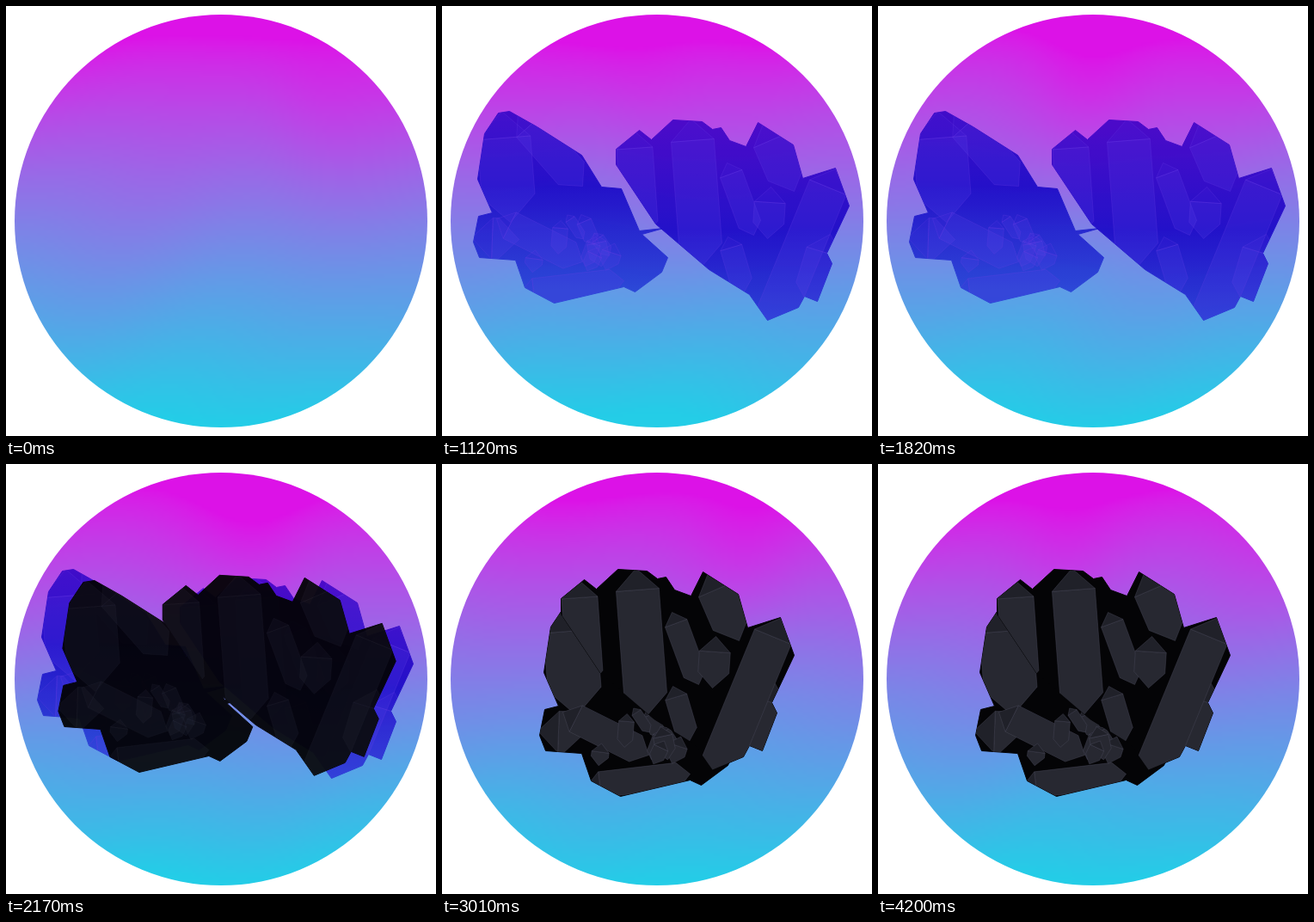
Animation of 500 by 500 pixels, one loop 4270 ms. Source, as an HTML page with a canvas:

```html
<!DOCTYPE html>
<html>
<head>
<meta charset="utf-8">
<style>
html, body { margin: 0; width: 100%; height: 100%; overflow: hidden; background: #fff; }
canvas { display: block; width: 500px; height: 500px; }
</style>
</head>
<body>
<canvas id="stage" width="500" height="500"></canvas>
<script>
const LOOP = 4270, STEP = 70, GRID = 125, CELL = 500 / GRID;
const ctx = document.getElementById('stage').getContext('2d');

function layer(size) {
  const c = document.createElement('canvas');
  c.width = c.height = size;
  return c.getContext('2d');
}
const sky = layer(GRID), ghost = layer(500), solid = layer(500);
const pixels = sky.createImageData(GRID, GRID);

const clamp = v => Math.max(0, Math.min(1, v));
const ramp = (t, a, b) => clamp((t - a) / (b - a));
const smooth = p => p * p * (3 - 2 * p);
const mix = (a, b, p) => a + (b - a) * p;

let seed = 7;
function random(a, b) {
  seed = seed * 16807 % 2147483647;
  return mix(a, b, seed / 2147483647);
}

// Magenta to cyan, bent by drifting waves and one hanging swell
function drawSky(t) {
  const a = t / LOOP * 2 * Math.PI;
  const swellX = 290 + 70 * Math.cos(1.5 * a);
  for (let j = 0, k = 0; j < GRID; j++) {
    for (let i = 0; i < GRID; i++, k += 4) {
      const x = i * CELL, y = j * CELL;
      const shift = 5 * Math.sin(x / 60 + a) + 5 * Math.sin(x / 37 - 2 * a + y / 70)
        + 4 * Math.sin(y / 45 + x / 90 + 3 * a)
        + 26 * Math.exp(-(((x - swellX) / 65) ** 2) - ((y - 115) / 90) ** 2);
      const u = ramp(y - shift, 35, 480);
      pixels.data.set([220 - 184 * u, 18 + 187 * u ** .75, 231, 255], k);
    }
  }
  sky.putImageData(pixels, 0, 0);
  ctx.drawImage(sky.canvas, 0, 0, 500, 500);
}

const toPath = points => new Path2D('M' + points.join('L') + 'Z');

// A six-sided crystal from tip to end, with a darker cap
function crystal(x1, y1, x2, y2, width) {
  const len = Math.hypot(x2 - x1, y2 - y1), r = width / 2;
  const ux = (x2 - x1) / len, uy = (y2 - y1) / len;
  const at = (along, side) => [x1 + ux * along - uy * side, y1 + uy * along + ux * side];
  const l = at(r, r), m = at(r, -r);
  return {
    body: toPath([l, m, at(len - r, -r), at(len, 0), at(len - r, r)]),
    cap: toPath([at(0, 0), l, m])
  };
}

// Both halves are described where they fit together; "away" is the split position.
const left = {
  away: [-77, -41],
  shape: toPath(['142,165', '155,163', '187,181', '239,214', '262,251', '285,253', '306,302',
    '334,299', '309,306', '339,333', '332,350', '301,373', '288,367', '207,386', '173,368',
    '162,336', '120,333', '113,315', '119,285', '135,281', '118,242', '126,189']),
  crystals: [
    crystal(165, 165, 240, 250, 40),
    crystal(146, 163, 156, 292, 62),
    crystal(111, 310, 166, 312, 48),
    crystal(140, 288, 240, 338, 34),
    crystal(168, 374, 288, 360, 30)
  ]
};
for (let i = 0; i < 9; i++) {
  const x = random(185, 285), y = random(260, 330);
  left.crystals.push(crystal(x, y, x + random(-15, 25), y + random(22, 40), random(10, 24)));
}
const right = {
  away: [64, 10],
  shape: toPath(['138,156', '165,134', '179,145', '204,122', '238,124', '250,133', '260,131',
    '270,146', '289,153', '303,125', '344,151', '355,190', '393,178', '409,222', '383,277',
    '389,289', '372,333', '357,327', '350,340', '314,355', '293,325', '246,296', '184,243',
    '138,174']),
  crystals: [
    crystal(158, 134, 167, 262, 42),
    crystal(225, 121, 238, 292, 50),
    crystal(267, 172, 298, 256, 27),
    crystal(310, 124, 345, 205, 46),
    crystal(318, 200, 314, 260, 36),
    crystal(268, 258, 287, 322, 26),
    crystal(387, 255, 362, 338, 44),
    crystal(393, 179, 312, 376, 46)
  ]
};

const blueFill = ghost.createLinearGradient(0, 130, 0, 370);
['#4508c8', '#1e0cc8', '#2a44d6'].forEach((c, i) => blueFill.addColorStop(i / 2, c));

const blue = {
  base: blueFill, edge: 'rgba(105,60,225,.25)',
  body: 'rgba(85,60,225,.22)', cap: 'rgba(75,40,220,.14)'
};
const black = { base: '#040406', edge: 'rgba(75,77,92,.4)', body: '#272831', cap: '#202129' };

// gap: 1 = halves apart, 0 = joined
function drawRock(g, skin, gap, detail) {
  g.clearRect(0, 0, 500, 500);
  g.lineJoin = 'round';
  for (const { away, shape, crystals } of [left, right]) {
    g.save();
    g.translate(away[0] * gap + .5, away[1] * gap + .5);
    g.fillStyle = g.strokeStyle = skin.base;
    g.fill(shape);
    g.stroke(shape);
    g.clip(shape);
    g.globalAlpha = detail;
    g.strokeStyle = skin.edge;
    for (const item of crystals) {
      for (const face of ['body', 'cap']) {
        g.fillStyle = skin[face];
        g.fill(item[face]);
        g.stroke(item[face]);
      }
    }
    g.restore();
  }
}
drawRock(ghost, blue, 1, 1);

// The blue halves settle out of a row-wise jitter, then fade behind the black ones
function drawGhost(t) {
  const jag = 6 * (1 - ramp(t, 350, 910));
  ctx.globalAlpha = .95 * ramp(t, 350, 630) * (1 - ramp(t, 2200, 2520));
  for (let y = 0; y < 500; y += 2) {
    ctx.drawImage(ghost.canvas, 0, y, 500, 2, jag * Math.sin(y * 1.1), y, 500, 2);
  }
  ctx.globalAlpha = 1;
}

function drawSolid(t) {
  const p = ramp(t, 1960, 2520);
  drawRock(solid, black, 1 - smooth(p), mix(.1, 1, p * p));
  ctx.globalAlpha = ramp(t, 1960, 2170) * mix(.92, 1, p);
  ctx.drawImage(solid.canvas, 0, 0);
  ctx.globalAlpha = 1;
}

const start = performance.now();
function frame() {
  const t = Math.floor((performance.now() - start) % LOOP / STEP) * STEP;
  ctx.clearRect(0, 0, 500, 500);
  ctx.save();
  ctx.beginPath();
  ctx.arc(250, 250, 240, 0, 2 * Math.PI);
  ctx.clip();
  drawSky(t);
  drawGhost(t);
  drawSolid(t);
  ctx.restore();
  requestAnimationFrame(frame);
}
frame();
</script>
</body>
</html>
```
